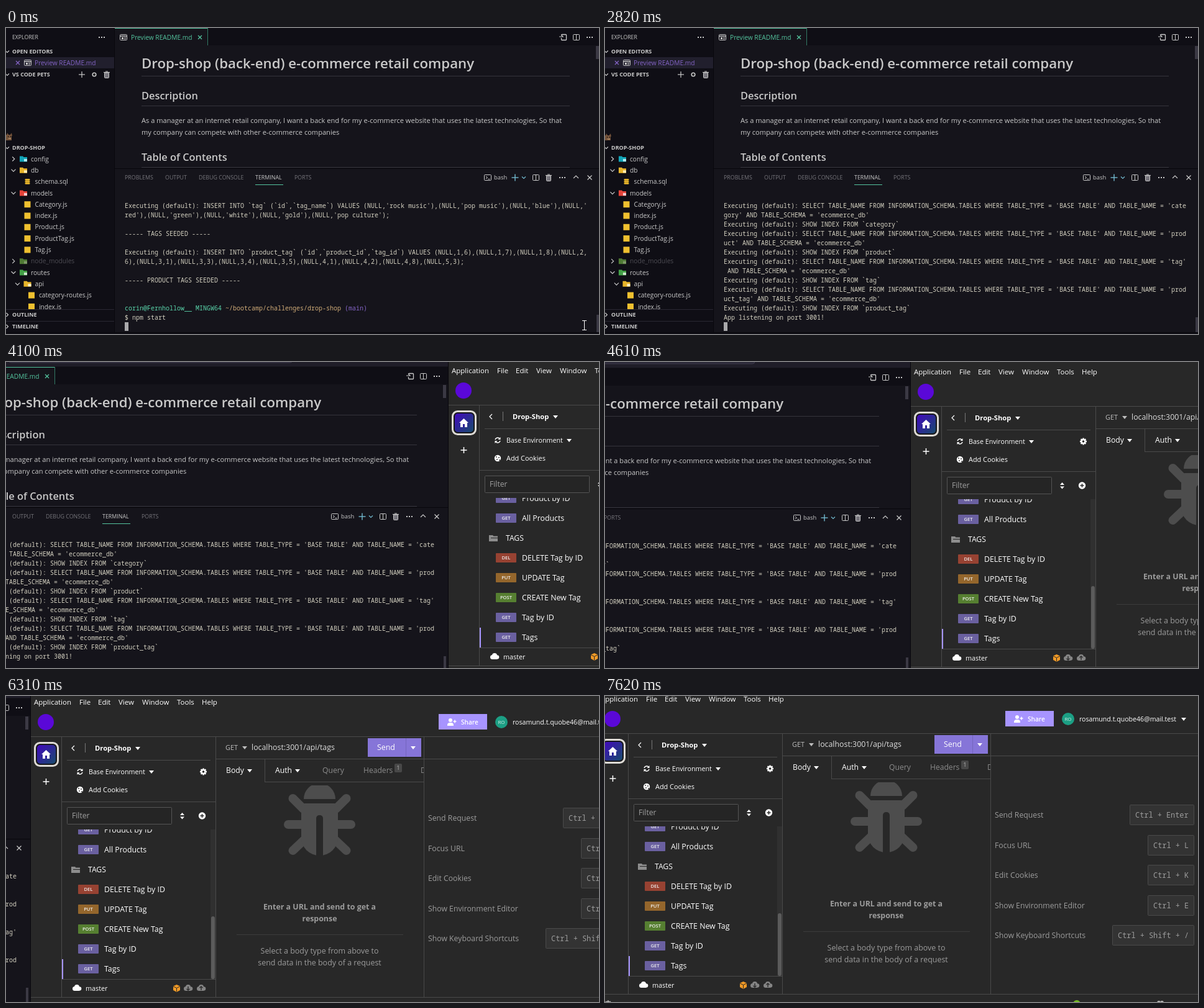
An HTML page with a canvas that plays this animation: 954x493 px, repeating every 8000 ms.

```html
<!DOCTYPE html>
<html lang="en">
<head>
<meta charset="utf-8">
<title>Screen pan</title>
<style>
html, body { margin: 0; width: 100%; height: 100%; overflow: hidden; background: #15141b; }
canvas { display: block; width: 954px; height: 493px; }
</style>
</head>
<body>
<canvas id="stage" width="954" height="493"></canvas>
<script>
const ctx = document.getElementById("stage").getContext("2d");
const LOOP = 8000;
const SANS = '"Open Sans", "Noto Sans", sans-serif';
const MONO = '"Noto Sans Mono", "DejaVu Sans Mono", monospace';
const FG = "#c9c9c9", GREEN = "#54c59f", PURPLE = "#8464c6", SAND = "#d0ac78";
const DARK = "#0f0e15", EDITOR = "#15141b", RULE = "#35343c";
const APP = "#282828", EDGE = "#4a4a4a", MUTED = "#9c9c9c", WHITE = "#fff";

// Screen refresh moments: [start, count], 120 ms apart inside a run.
const ticks = [[0, 2], [270, 9], [1380, 1], [1530, 2], [1800, 3], [2200, 1], [2340, 5], [3290, 1],
  [3440, 1], [3590, 1], [3740, 7], [4610, 6], [5360, 2], [5630, 2], [5900, 1], [6050, 2],
  [6310, 1], [6450, 1], [6600, 3], [6990, 2], [7260, 4]]
  .flatMap(([start, n]) => Array.from({ length: n }, (_, i) => start + i * 120));

// Camera keys: time, x, y.
const pan = [[3180, 0, 0], [3740, 113, 6], [4610, 466, 10], [5360, 714, 4], [6310, 918, 4], [7620, 970, -1]];

// Monotone cubic interpolation through the camera keys.
function camera(t, axis) {
  const last = pan.length - 1;
  if (t <= pan[0][0]) return 0;
  if (t >= pan[last][0]) return pan[last][axis];
  const rate = i => (pan[i + 1][axis] - pan[i][axis]) / (pan[i + 1][0] - pan[i][0]);
  const slope = i => {
    if (i === 0 || i === last) return 0;
    const a = rate(i - 1), b = rate(i);
    return a * b > 0 ? 2 * a * b / (a + b) : 0;
  };
  const i = pan.findIndex((key, n) => n < last && t < pan[n + 1][0]);
  const h = pan[i + 1][0] - pan[i][0], u = (t - pan[i][0]) / h;
  const u2 = u * u, u3 = u2 * u, s = 3 * u2 - 2 * u3;
  return Math.round(pan[i][axis] * (1 - s) + pan[i + 1][axis] * s
    + h * (slope(i) * (u3 - 2 * u2 + u) + slope(i + 1) * (u3 - u2)));
}

function rect(x, y, w, h, color) {
  ctx.fillStyle = color;
  ctx.fillRect(x, y, w, h);
}
function box(x, y, w, h, r, fill, stroke, width = 1) {
  ctx.beginPath();
  ctx.roundRect(x, y, w, h, r);
  if (fill) { ctx.fillStyle = fill; ctx.fill(); }
  if (stroke) { ctx.strokeStyle = stroke; ctx.lineWidth = width; ctx.stroke(); }
}
function disc(x, y, r, color) {
  ctx.beginPath();
  ctx.arc(x, y, r, 0, Math.PI * 2);
  ctx.fillStyle = color;
  ctx.fill();
}
function line(points, color, width = 1) {
  ctx.beginPath();
  for (let i = 0; i < points.length; i += 2) ctx.lineTo(points[i], points[i + 1]);
  ctx.strokeStyle = color;
  ctx.lineWidth = width;
  ctx.stroke();
}
function poly(points, color) {
  ctx.beginPath();
  for (let i = 0; i < points.length; i += 2) ctx.lineTo(points[i], points[i + 1]);
  ctx.fillStyle = color;
  ctx.fill();
}
// y is the middle of the capitals; baselines sit on whole pixels.
function text(str, x, y, size, color, weight = 400, align = "left", family = SANS) {
  ctx.font = `${weight} ${size}px ${family}`;
  ctx.textAlign = align;
  ctx.fillStyle = color;
  ctx.fillText(str, x, Math.round(y + size * 0.355));
}
function clipped(x, y, w, h, draw) {
  ctx.save();
  ctx.beginPath();
  ctx.rect(x, y, w, h);
  ctx.clip();
  draw();
  ctx.restore();
}
function chevron(x, y, dir, color = FG, s = 3.5) {
  const a = s, b = s / 2;
  const shapes = {
    down: [x - a, y - b, x, y + b, x + a, y - b],
    up: [x - a, y + b, x, y - b, x + a, y + b],
    right: [x - b, y - a, x + b, y, x - b, y + a],
    left: [x + b, y - a, x - b, y, x + b, y + a]
  };
  line(shapes[dir], color, 1.2);
}
const caret = (x, y, color = WHITE) => poly([x - 4, y - 2, x + 4, y - 2, x, y + 3], color);
const dots = (x, y) => [-4, 0, 4].forEach(d => rect(x + d - 1, y - 1, 2, 2, FG));
const cross = (x, y, s, color) => {
  line([x - s, y - s, x + s, y + s], color, 1.2);
  line([x - s, y + s, x + s, y - s], color, 1.2);
};
const plus = (x, y, s, color, w = 1.2) => {
  line([x - s, y, x + s, y], color, w);
  line([x, y - s, x, y + s], color, w);
};
function trash(x, y) {
  line([x - 5, y - 3.5, x + 5, y - 3.5], FG, 1.2);
  line([x - 2, y - 5, x + 2, y - 5], FG);
  box(x - 3.5, y - 3, 7, 8.5, 1, "#77757d", FG);
}
function splitIcon(x, y) {
  box(x - 4.5, y - 4.5, 10, 9, 1, null, FG);
  line([x + .5, y - 4.5, x + .5, y + 4.5], FG);
}
function previewIcon(x, y) {
  box(x - 5.5, y - 4.5, 11, 9, 1, null, FG);
  line([x - 5, y - 2, x + 5, y - 2], FG, 1.5);
  rect(x - 3, y, 3, 3, FG);
  line([x + 1, y + .5, x + 4, y + .5], FG);
  line([x + 1, y + 2.5, x + 4, y + 2.5], FG);
}
function folder(x, y, color, w = 12, h = 9) {
  poly([x - w / 2, y - h / 2, x - 1, y - h / 2, x + .5, y - h / 2 + 1.5, x + w / 2, y - h / 2 + 1.5,
    x + w / 2, y + h / 2, x - w / 2, y + h / 2], color);
}

// Terminal buffer, hard wrapped at 124 columns.
const wrap = str => str.match(/.{1,124}/g) || [""];
const run = "Executing (default): ";
const sync = table => [
  `${run}SELECT TABLE_NAME FROM INFORMATION_SCHEMA.TABLES WHERE TABLE_TYPE = 'BASE TABLE' AND TABLE_NAME = '${table}' AND TABLE_SCHEMA = 'ecommerce_db'`,
  `${run}SHOW INDEX FROM \`${table}\``
];
const seeds = pairs => pairs.map(p => `(NULL,${p})`).join(",") + ";";
const PROMPT = "corin@Fernhollow__ MINGW64 ";
const FOLDER = "~/bootcamp/challenges/drop-shop ";
const rows = [
  "",
  run + "INSERT INTO `tag` (`id`,`tag_name`) VALUES " + seeds(["rock music", "pop music", "blue", "red", "green", "white", "gold", "pop culture"].map(s => `'${s}'`)),
  "", "----- TAGS SEEDED -----", "",
  run + "INSERT INTO `product_tag` (`id`,`product_id`,`tag_id`) VALUES " + seeds("1,6 1,7 1,8 2,6 3,1 3,3 3,4 3,5 4,1 4,2 4,8 5,3".split(" ")),
  "", "----- PRODUCT TAGS SEEDED -----", "", "", PROMPT, "$ npm start",
  "", "> drop-shop@1.0.0 start", "> node server.js", "",
  ...["category", "product", "tag", "product_tag"].flatMap(sync),
  "App listening on port 3001!"
].flatMap(wrap);
const printed = [[990, 17], [870, 12], [750, 9], [630, 6], [270, 4], [0, 0]];

function terminal(t) {
  const added = printed.find(p => t >= p[0])[1];
  const mono = (str, x, y, color) => text(str, x, y, 10, color, 500, "left", MONO);
  rows.slice(added, added + 14).forEach((row, i) => {
    const y = 271 + i * 15;
    if (row === PROMPT) {
      mono(row, 191, y, "#5ad6ac");
      mono(FOLDER, 191 + row.length * 6, y, SAND);
      mono("(main)", 191 + (row + FOLDER).length * 6, y, PURPLE);
    } else mono(row, 191, y, "#d2cfbf");
  });
  if (t < 3290) rect(191, 474, 6, 14, "#a9a9ab");
  else box(191.5, 473.5, 5, 14, 0, null, "#a9a9ab");
  const top = 462 + added * 4 / 17;
  rect(950, top, 4, 490 - top, "#3b3944");
}

function pet(t) {
  const bob = ticks.filter(x => x <= t).length % 4 < 2 ? 0 : 1;
  rect(0, 172 + bob, 9, 9 - bob, "#75543b");
  poly([1, 173 + bob, 2, 169 + bob, 5, 173 + bob], "#75543b");
  poly([6, 173 + bob, 9, 169 + bob, 10, 174 + bob], "#75543b");
  rect(3, 174 + bob, 1, 2, "#1d1512");
  rect(7, 174 + bob, 1, 2, "#1d1512");
  rect(4, 177 + bob, 4, 2, "#a3805e");
}

// Rows: name, depth, icon colour, kind (chevron direction or "db"), emblem colour.
const tree = [
  ["config", 0, "#12a5b8", "right", "#b2ebf2"], ["db", 0, "#e8b52a", "down", "#ffecb3"], ["schema.sql", 1, "#e8b52a", "db"],
  ["models", 0, "#e5443a", "down", "#ffcdd2"], ["Category.js", 1], ["index.js", 1], ["Product.js", 1],
  ["ProductTag.js", 1], ["Tag.js", 1], ["node_modules", 0, "#4f7a34", "right", "#7f9a6a"],
  ["routes", 0, "#43a047", "down", "#c8e6c9"], ["api", 1, "#e8b52a", "down", "#fff3cd"], ["category-routes.js", 2], ["index.js", 2]
];

function sidebar(t) {
  rect(0, 0, 174, 490, DARK);
  text("EXPLORER", 10, 15, 8.7, FG);
  dots(154, 15);
  rect(0, 47, 174, 18, "#211f2d");
  const sections = [["OPEN EDITORS", 38, "down"], ["VS CODE PETS", 75, "down"], ["DROP-SHOP", 193, "down"],
    ["OUTLINE", 462, "right"], ["TIMELINE", 481, "right"]];
  for (const [name, y, dir] of sections) {
    text(name, 10, y, 9, FG, 700);
    chevron(2, y, dir, FG, 3);
  }
  cross(19, 56, 3, PURPLE);
  previewIcon(35, 56);
  text("Preview README.md", 46, 56, 10.2, PURPLE);
  plus(122, 75, 5, FG);
  ctx.beginPath();
  ctx.arc(142, 75, 2.8, 0, 7);
  ctx.strokeStyle = FG;
  ctx.lineWidth = 1.6;
  ctx.stroke();
  trash(162, 75);
  pet(t);
  clipped(0, 200, 174, 253, () => tree.forEach(([name, depth, color, kind, emblem], i) => {
    const y = 211 + i * 18.3, x = 28 + depth * 6.5;
    if (kind === "db") {
      [-3, 0, 3].forEach(d => box(x - 4, y + d - 1.5, 8, 2.6, 1.3, color));
    } else if (kind) {
      folder(x, y, color);
      rect(x + 1, y, 5, 4, emblem);
      chevron(x - 16, y, kind);
    } else rect(x - 5, y - 5, 10, 10, "#efc02f");
    text(name, x + 12, y, 10.2, name === "node_modules" ? "#4d4c53" : FG);
  }));
  rect(0, 453, 174, 1, "#2a2833");
  rect(0, 472, 174, 1, "#2a2833");
  rect(174, 0, 1, 490, "#08070c");
}

function editor(t) {
  rect(-20, -30, 977, 560, EDITOR);
  rect(-20, -30, 977, 29, "#1f1d28");
  box(250, -26, 457, 19, 4, "#2b2938", "#3c394b");
  rect(175, 0, 782, 28, DARK);
  rect(175, 0, 149, 28, EDITOR);
  rect(175, 0, 149, 1, GREEN);
  rect(324, 0, 1, 28, "#337a66");
  previewIcon(189, 15);
  text("Preview README.md", 201, 15, 10.2, GREEN);
  cross(312, 15, 3, GREEN);
  box(893.5, 10.5, 8, 9, 1, null, FG, 1.3);
  rect(890, 12, 6, 4, DARK);
  line([890, 14, 896, 14, 893.5, 11.5], FG, 1.2);
  splitIcon(917, 15);
  dots(939, 15);
  rect(949, 29, 5, 21, "#3b3944");

  text("Drop-shop (back-end) e-commerce retail company", 218, 57, 22.23, FG, 600);
  text("Description", 218, 109.5, 16.4, FG, 600);
  text("As a manager at an internet retail company, I want a back end for my e-commerce website that uses the latest technologies, So that", 218, 149, 11.08, FG);
  text("my company can compete with other e-commerce companies", 218, 168, 11.08, FG);
  text("Table of Contents", 218, 208.5, 16.4, FG, 600);
  [77, 125, 224].forEach(y => rect(218, y, 689, 1, RULE));

  rect(175, 226, 782, 1, "#08070c");
  [["PROBLEMS", 191], ["OUTPUT", 256], ["DEBUG CONSOLE", 310], ["TERMINAL", 401], ["PORTS", 464]]
    .forEach(([name, x]) => text(name, x, 241, 8.85, name === "TERMINAL" ? FG : "#77767c"));
  rect(401, 252, 45, 1, GREEN);
  box(769.5, 236.5, 11, 9, 1, null, FG);
  line([772, 239, 774.5, 241, 772, 243], FG);
  line([775.5, 243.5, 778.5, 243.5], FG);
  text("bash", 785, 241, 9.4, FG);
  plus(819, 241, 5.5, "#72b9cf", 1.4);
  chevron(833, 241, "down", "#72b9cf", 3);
  splitIcon(852, 241);
  trash(873, 241);
  dots(895, 241);
  chevron(917, 240, "up", FG, 4);
  cross(939, 241, 3.5, FG);
  terminal(t);
  rect(-20, 490, 977, 40, DARK);
  rect(-20, 490, 977, 1, "#08070c");
}

function mouse(t) {
  if (t >= 2460) return;
  const [x, y] = t < 2200 ? [930, 479] : t < 2340 ? [889, 487] : [870, 493];
  line([x + .5, y - 7, x + .5, y + 7], WHITE);
  [-7.5, 7.5].forEach(d => line([x - 3, y + d, x + 4, y + d], WHITE));
}

function cloud(x, y, color, arrow) {
  disc(x - 3.5, y + 1.5, 3.5, color);
  disc(x, y - 1, 4, color);
  disc(x + 4, y + 1.5, 3.3, color);
  rect(x - 4, y + 1, 8, 4, color);
  if (!arrow) return;
  line([x, y - 2, x, y + 4], APP, 1.4);
  chevron(x, y + arrow * 2 + 1, arrow > 0 ? "down" : "up", APP, 2.5);
}
function gear(x, y, color) {
  for (let i = 0; i < 4; i++) {
    const dx = 5.5 * Math.cos(i * Math.PI / 4), dy = 5.5 * Math.sin(i * Math.PI / 4);
    line([x - dx, y - dy, x + dx, y + dy], color, 2.4);
  }
  disc(x, y, 4.2, color);
  disc(x, y, 1.8, APP);
}
function bug() {
  const gray = "#4d4d4d";
  ctx.beginPath();
  ctx.arc(708.5, 166, 25.5, Math.PI, 0);
  ctx.fillStyle = gray;
  ctx.fill();
  ctx.lineCap = "round";
  ctx.lineJoin = "round";
  line([658, 207, 759, 207], gray, 14);
  for (const s of [-1, 1]) {
    line([708.5 + s * 43, 165, 708.5 + s * 26, 182], gray, 14);
    line([708.5 + s * 43, 249, 708.5 + s * 24, 231], gray, 14);
  }
  ctx.lineCap = "butt";
  ctx.lineJoin = "miter";
  box(679, 173, 59, 84, [6, 6, 29, 29], gray);
  box(703, 192, 11, 68, [5, 5, 0, 0], APP);
}

const requests = [
  ["GET", "Product by ID"], ["GET", "All Products"], ["", "TAGS"], ["DEL", "DELETE Tag by ID"],
  ["PUT", "UPDATE Tag"], ["POST", "CREATE New Tag"], ["GET", "Tag by ID"], ["GET", "Tags"]
];
const methodColor = { GET: "#6a60a0", DEL: "#974232", PUT: "#94662c", POST: "#567f31" };
const shortcuts = [["Send Request", "Ctrl + Enter"], ["Focus URL", "Ctrl + L"], ["Edit Cookies", "Ctrl + K"],
  ["Show Environment Editor", "Ctrl + E"], ["Show Keyboard Shortcuts", "Ctrl + Shift + /"]];

function appHeader() {
  [["Application", 249], ["File", 322], ["Edit", 352], ["View", 385], ["Window", 423], ["Tools", 479], ["Help", 519]]
    .forEach(([name, x]) => text(name, x, 10, 11.5, WHITE));
  disc(268, 42, 13, "#5a08d8");
  rect(900, 29, 78, 25, "#a794ff");
  disc(919, 39, 3, WHITE);
  box(914, 43, 10, 5, [4, 4, 0, 0], WHITE);
  plus(926, 41, 2.5, WHITE, 1.5);
  text("Share", 936, 42, 10.1, WHITE, 600);
  disc(1001, 42, 10, "#1c9f84");
  text("RO", 1001, 42, 8, "#d5ebe6", 400, "center");
  text("rosamund.t.quobe46@mail.test", 1019, 42, 10.6, WHITE);
  caret(1187, 42);
}

function appSidebar() {
  const glow = ctx.createLinearGradient(254, 79, 284, 109);
  glow.addColorStop(0, "#4208bd");
  glow.addColorStop(1, "#174c6c");
  box(250.5, 75.5, 37, 37, 8, "#18181c", "#dedbd5", 3);
  box(254, 79, 30, 30, 5, glow);
  poly([268.5, 87, 276, 94, 274, 94, 274, 101, 263, 101, 263, 94, 261, 94], WHITE);
  rect(267, 96, 3, 5, "#30249b");
  plus(268.5, 138, 5, WHITE, 1.5);

  chevron(312, 84, "left", WHITE, 4);
  rect(331, 76, 1, 15, "#777");
  text("Drop-Shop", 347, 84, 11.2, WHITE, 700);
  caret(416, 84);
  ctx.strokeStyle = WHITE;
  ctx.lineWidth = 1.5;
  [.2, 3.35].forEach(a => { ctx.beginPath(); ctx.arc(323, 122, 4, a, a + 2.3); ctx.stroke(); });
  poly([327.5, 117, 327.5, 121, 323.5, 121], WHITE);
  poly([318.5, 127, 318.5, 123, 322.5, 123], WHITE);
  text("Base Environment", 337, 122, 10.7, WHITE);
  caret(438, 122);
  gear(521.5, 122, WHITE);
  disc(323, 151, 5.2, WHITE);
  [[321, 149], [325, 150], [322, 153], [326, 154]].forEach(([x, y]) => disc(x, y, .9, APP));
  text("Add Cookies", 337, 151, 10.9, WHITE);
  box(302.5, 179.5, 168, 27, 1, "#252525", "#555");
  text("Filter", 310, 193, 12.2, "#a0a0a0");
  poly([484, 192, 491, 192, 487.5, 188], WHITE);
  poly([484, 194.5, 491, 194.5, 487.5, 198.5], WHITE);
  disc(519.5, 193, 5.7, WHITE);
  plus(519.5, 193, 3, APP, 1.5);

  clipped(294, 215, 247, 241, () => {
    requests.forEach(([method, name], i) => {
      const y = 216 + i * 32;
      if (method) {
        box(320, y - 8, 33, 15, 1, methodColor[method]);
        text(method, 336.5, y - .5, 7.6, "#eee", 600, "center");
        text(name, 362, y, 12.35, WHITE);
      } else {
        folder(316, y, "#8d8d8d", 14, 10);
        line([312, y - .5, 324, y - .5], APP);
        text(name, 336, y, 12.2, WHITE);
      }
    });
    rect(294, 424, 2, 32, "#a896ff");
    rect(533, 215, 8, 241, "#303030");
    box(534, 355, 6, 101, 3, "#5b5b5b");
  });
  cloud(318, 470, WHITE);
  text("master", 332, 471, 10.8, WHITE);
  poly([478.5, 465, 484, 467.5, 484, 474, 478.5, 477, 473, 474, 473, 467.5], "#f19a26");
  line([473, 467.8, 478.5, 470.5, 484, 467.8], APP);
  line([478.5, 470.5, 478.5, 476.5], APP);
  cloud(497, 470, "#858585", 1);
  cloud(518, 470, "#858585", -1);
}

function requestPane() {
  text("GET", 557, 83, 10.9, "#bdbdbd");
  caret(588, 83, "#bdbdbd");
  text("localhost:3001/api/tags", 599, 83, 12.37, "#dcdcdc");
  rect(786, 68, 86, 30, "#8675d8");
  rect(847, 68, 1, 30, "#7465bd");
  text("Send", 801, 83, 12.4, WHITE);
  caret(859, 83);
  text("Body", 558, 120, 12.2, WHITE);
  caret(596, 120);
  text("Auth", 637, 120, 12.2, WHITE);
  caret(673, 120);
  text("Query", 713, 120, 12.2, "#8b8b8b");
  text("Headers", 779, 120, 12.1, "#8b8b8b");
  box(829, 109, 12, 14, 2, "#484848");
  text("1", 835, 116, 8.5, "#bbb", 400, "center");
  clipped(860, 105, 16, 30, () => text("Docs", 871, 120, 12.2, "#8b8b8b"));
  clipped(542, 144, 334, 130, bug);
  text("Enter a URL and send to get a", 708.5, 340, 12.4, MUTED, 700, "center");
  text("response", 708.5, 359, 12.4, MUTED, 700, "center");
  rect(575, 384, 268, 1, "#3c3c3c");
  text("Select a body type from above to", 708.5, 411, 12.45, MUTED, 400, "center");
  text("send data in the body of a request", 708.5, 430, 12.45, MUTED, 400, "center");
}

function shortcutPane() {
  shortcuts.forEach(([name, keys], i) => {
    const y = 197 + i * 48.5, w = Math.round(keys.length * 7.14 + 18);
    text(name, 883, y, 12.25, MUTED);
    box(1204.5 - w, Math.round(y) - 16.5, w - 1, 32, 1, "#333", EDGE);
    text(keys, 1213 - w, y, 11.9, MUTED, 400, "left", MONO);
  });
}

function app() {
  rect(244, -30, 1010, 600, APP);
  rect(243, -30, 1, 600, "#08070c");
  const across = [[244, 65, 1010], [302, 103, 231], [294, 170, 247], [294, 456, 247], [542, 101, 712], [620, 138, 256], [244, 485, 1010]];
  across.forEach(([x, y, w]) => rect(x, y, w, 1, EDGE));
  [[293, 65, 420], [541, 65, 420], [876, 65, 420], [620, 101, 38]].forEach(([x, y, h]) => rect(x, y, 1, h, EDGE));
  appHeader();
  appSidebar();
  requestPane();
  shortcutPane();
  gear(261, 501, "#bbb");
  disc(1015, 501, 6, "#75ba24");
  disc(1147, 499, 3, "#bbb");
  disc(1152, 499, 3, "#bbb");
}

function draw(now) {
  const clock = now % LOOP;
  const t = ticks.reduce((held, tick) => tick <= clock ? tick : held, 0);
  ctx.setTransform(1, 0, 0, 1, 0, 0);
  rect(0, 0, 954, 493, EDITOR);
  ctx.translate(-camera(t, 1), camera(t, 2));
  editor(t);
  sidebar(t);
  ctx.save();
  ctx.translate(714, -4);
  app();
  ctx.restore();
  mouse(t);
  requestAnimationFrame(draw);
}
requestAnimationFrame(draw);
</script>
</body>
</html>
```
